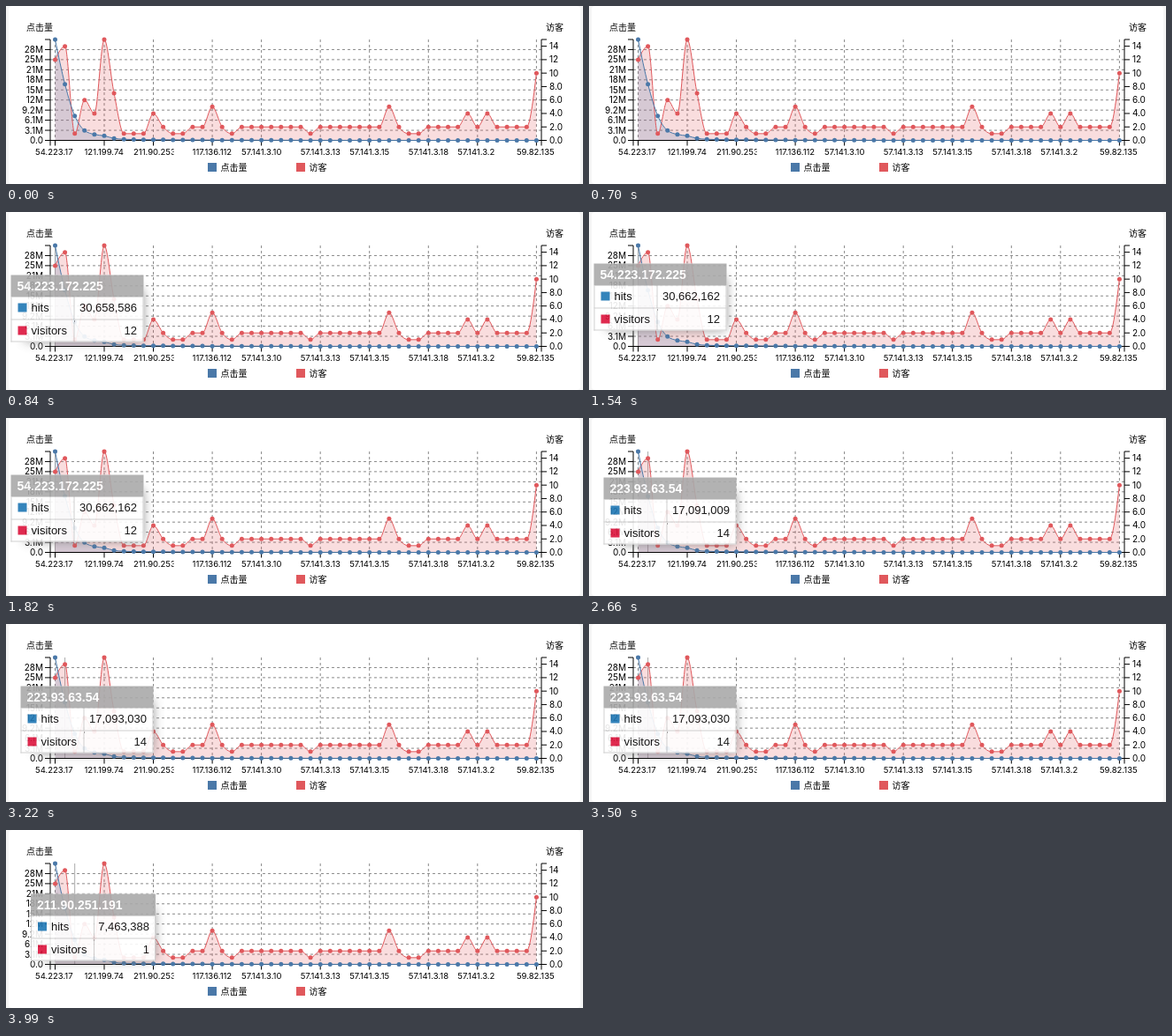
An HTML page for the animation above (4060 ms loop, 652 by 202 pixels).

```html
<!DOCTYPE html>
<html lang="zh">
<head>
<meta charset="utf-8">
<style>
  html, body { margin: 0; width: 100%; height: 100%; overflow: hidden; background: #f5f5f5; }
  #panel { position: absolute; left: 3px; top: 0; width: 646px; height: 202px; border-radius: 4px; background: #fff; }
  svg { position: absolute; left: 0; top: 0; }
  svg text { font: 10px Inter, "Noto Sans CJK SC", "Noto Sans CJK", sans-serif; fill: #000; }
  svg .category { font-size: 9.5px; }
  .grid { stroke: #888; stroke-dasharray: 3 3; }
  .axis { stroke: #000; fill: none; }
  #tip {
    position: absolute; left: 0; top: 0; height: 76px; opacity: .9; visibility: hidden;
    background: #fff; box-shadow: 7px 7px 12px -9px #777;
    font: 13px "Liberation Sans", Arial, sans-serif; color: #000; white-space: nowrap;
  }
  #tip .head {
    height: 25px; line-height: 25px; padding-left: 7px;
    background: #aaa; color: #fff; font-size: 14px; font-weight: bold;
  }
  #tip .row {
    position: relative; box-sizing: border-box; height: 25.5px; line-height: 24px;
    border: 1px solid #ccc; border-top: 0;
  }
  #tip i { position: absolute; left: 7px; top: 7px; width: 10px; height: 10px; }
  #tip .name { position: absolute; left: 22px; }
  #tip .value {
    position: absolute; left: 70px; right: 0; height: 100%; padding-right: 6px;
    text-align: right; border-left: 1px dotted #999;
  }
</style>
</head>
<body>
<div id="panel"></div>
<svg id="chart" width="652" height="202" viewBox="0 0 652 202"></svg>
<div id="tip">
  <div class="head"></div>
  <div class="row"><i style="background:#1f77b4"></i><span class="name">hits</span><span class="value"></span></div>
  <div class="row"><i style="background:#dc143c"></i><span class="name">visitors</span><span class="value"></span></div>
</div>
<script>
const LOOP = 4060;
const BLUE = '#4a78a8', RED = '#e0585c';
const LEFT = 50, RIGHT = 605, TOP = 38, BASE = 152.5;
const chart = document.getElementById('chart');

const visitors = [
  12, 14, 1, 6, 4, 15, 7, 1, 1, 1, 4, 2, 1, 1, 2, 2, 5, 2, 1,
  ...Array(7).fill(2), 1, ...Array(7).fill(2), 5, 2, 1, 1,
  2, 2, 2, 2, 4, 2, 4, 2, 2, 2, 2, 10
];
const headHits = [30.66, 17.09, 7.46, 3, 1.8, 1.4, 0.6, 0.35];
const hits = visitors.map((_, i) => headHits[i] ?? 0.25 * Math.exp((8 - i) / 8));

const xAt = i => 55.5 + i * 11.1;
const hitsY = v => BASE - v * 3.735;
const visitorsY = v => BASE - v * 7.633;

function add(tag, attrs, text) {
  const el = document.createElementNS('http://www.w3.org/2000/svg', tag);
  for (const key in attrs) el.setAttribute(key, attrs[key]);
  if (text) el.textContent = text;
  chart.append(el);
  return el;
}
const line = (x1, y1, x2, y2, cls) => add('line', { x1, y1, x2, y2, class: cls });
const label = (x, y, text, anchor = 'start') => add('text', { x, y, 'text-anchor': anchor }, text);

// Monotone cubic through evenly spaced points.
function smoothPath(ys) {
  const step = 11.1, last = ys.length - 1;
  const slope = ys.slice(1).map((y, i) => (y - ys[i]) / step);
  const tangent = ys.map((_, i) => {
    const a = slope[i - 1], b = slope[i];
    if (i === 0 || i === last || a * b <= 0) return 0;
    return Math.sign(a) * Math.min(2 * Math.abs(a), 2 * Math.abs(b), Math.abs(a + b) / 2);
  });
  tangent[0] = (3 * slope[0] - tangent[1]) / 2;
  tangent[last] = (3 * slope[last - 1] - tangent[last - 1]) / 2;
  const third = step / 3;
  let d = `M${xAt(0)},${ys[0]}`;
  for (let i = 0; i < last; i++) {
    d += `C${xAt(i) + third},${ys[i] + tangent[i] * third} `
      + `${xAt(i + 1) - third},${ys[i + 1] - tangent[i + 1] * third} ${xAt(i + 1)},${ys[i + 1]}`;
  }
  return d;
}

const categories = {
  0: '54.223.17', 5: '121.199.74', 10: '211.90.253', 16: '117.136.112', 21: '57.141.3.10',
  27: '57.141.3.13', 32: '57.141.3.15', 38: '57.141.3.18', 43: '57.141.3.2', 49: '59.82.135'
};
const hitLabels = ['0.0', '3.1M', '6.1M', '9.2M', '12M', '15M', '18M', '21M', '25M', '28M'];
const visitorLabels = ['0.0', '2.0', '4.0', '6.0', '8.0', '10', '12', '14'];

for (const i in categories) line(xAt(i), TOP, xAt(i), BASE, 'grid');
hitLabels.forEach((_, k) => k && line(LEFT, hitsY(k * 3.066), RIGHT, hitsY(k * 3.066), 'grid'));
const focus = line(0, TOP, 0, BASE, '');
focus.setAttribute('stroke', '#aaa');

const series = [[visitors.map(visitorsY), RED], [hits.map(hitsY), BLUE]];
for (const [ys, color] of series) {
  add('path', { d: `${smoothPath(ys)}L${xAt(49)},${BASE}L${xAt(0)},${BASE}Z`, fill: color, 'fill-opacity': 0.2 });
}

add('path', { class: 'axis', d: `M44,${TOP}H${LEFT}V${BASE}H44` });
add('path', { class: 'axis', d: `M611,${TOP}H${RIGHT}V${BASE}H611` });
add('path', { class: 'axis', d: `M${LEFT},158.5V${BASE}H${RIGHT}V158.5` });
hitLabels.forEach((text, k) => {
  const y = hitsY(k * 3.066);
  line(44, y, LEFT, y, 'axis');
  label(42, y + 3.5, text, 'end');
});
visitorLabels.forEach((text, k) => {
  const y = visitorsY(k * 2);
  line(RIGHT, y, 611, y, 'axis');
  label(614, y + 3.5, text);
});
for (const i in categories) {
  const x = xAt(i);
  line(x, BASE, x, 158.5, 'axis');
  const clip = add('clipPath', { id: 'clip' + i });
  clip.append(add('rect', { x: x - 24, y: 158, width: 47, height: 14 }));
  const text = label(x - 22.5, 169, categories[i]);
  text.setAttribute('class', 'category');
  text.setAttribute('clip-path', `url(#clip${i})`);
}

for (const [ys, color] of series) {
  add('path', { d: smoothPath(ys), fill: 'none', stroke: color });
  ys.forEach((y, i) => add('circle', { cx: xAt(i), cy: y, r: 2.5, fill: color }));
}

label(23, 28, '点击量');
label(610, 28, '访客');
[[228, BLUE, '点击量'], [328, RED, '访客']].forEach(([x, fill, text]) => {
  add('rect', { x, y: 178, width: 10, height: 10, fill });
  label(x + 14.5, 187, text);
});

// Hovered point by index: address, tooltip left edge and width.
const hover = [
  ['54.223.172.225', 5.5, 149.5],
  ['223.93.63.54', 16.5, 149.5],
  ['211.90.251.191', 28, 141]
];
// Start time, hovered index, tooltip top, hits.
const steps = [
  [0, -1, 0, 0],
  [770, 0, 76, 30658586],
  [840, 0, 72, 30658586],
  [910, 0, 65, 30658586],
  [980, 0, 59, 30658586],
  [1540, 0, 59, 30662162],
  [1680, 0, 61, 30662162],
  [1750, 0, 63, 30662162],
  [1820, 0, 65, 30662162],
  [1890, 1, 63, 17088970],
  [2100, 1, 66, 17088970],
  [2450, 1, 66, 17091009],
  [2660, 1, 68, 17091009],
  [2730, 1, 71, 17091009],
  [3220, 1, 71, 17093030],
  [3780, 2, 68, 7463388],
  [3990, 2, 73, 7463388]
];

const tip = document.getElementById('tip');
const head = tip.querySelector('.head');
const [hitsCell, visitorsCell] = tip.querySelectorAll('.value');
let shown = null;

function show(step) {
  if (step === shown) return;
  shown = step;
  const [, index, top, count] = step;
  const visibility = index < 0 ? 'hidden' : 'visible';
  tip.style.visibility = focus.style.visibility = visibility;
  if (index < 0) return;
  const [address, left, width] = hover[index];
  tip.style.width = width + 'px';
  tip.style.transform = `translate(${left}px, ${top - 0.5}px)`;
  head.textContent = address;
  hitsCell.textContent = count.toLocaleString('en-US');
  visitorsCell.textContent = visitors[index];
  focus.setAttribute('x1', xAt(index));
  focus.setAttribute('x2', xAt(index));
}

const start = performance.now();
function tick() {
  const t = (performance.now() - start) % LOOP;
  show(steps.findLast(step => step[0] <= t));
  requestAnimationFrame(tick);
}
tick();
</script>
</body>
</html>
```
